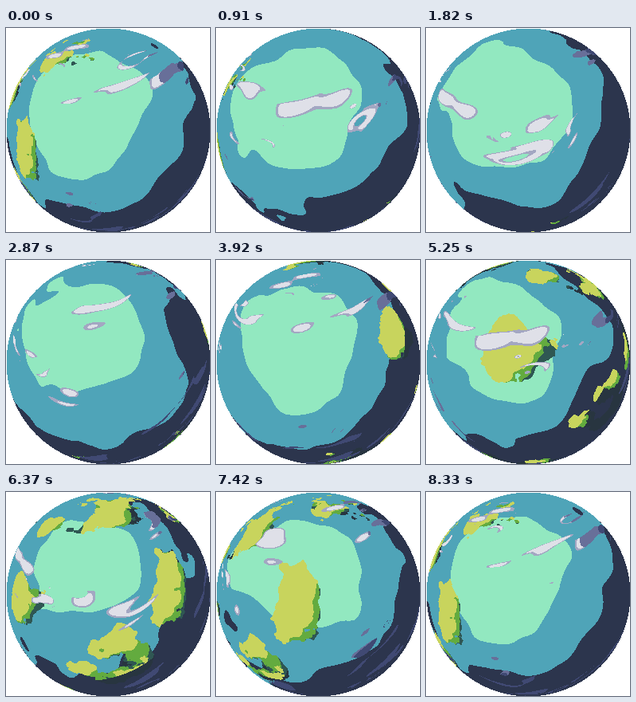
Recreate the animation shown at these times as an HTML page with a canvas. Size 256 px wide and 256 px high, loop 8400 ms.

```html
<!DOCTYPE html>
<html lang="en">
<head>
<meta charset="utf-8">
<title>Turning planet</title>
<style>
  html, body { margin: 0; height: 100%; overflow: hidden; background: #fff; }
  canvas { display: block; width: 100%; height: 100%; image-rendering: pixelated; }
</style>
</head>
<body>
<canvas id="stage" width="256" height="256"></canvas>
<script>
const SIZE = 256, FRAMES = 120, STEP = 70;
const SEED = 6.14, LIGHT = 0.39, TILT = 0.2;
const WATER_SCALE = 5.228, LAND_SCALE = 4.292, CLOUD_SCALE = 7.745;
const SEA_LEVEL = 0.633, CLOUD_LEVEL = 0.565;

const mod = (a, n) => ((a % n) + n) % n;
const fract = a => a - Math.floor(a);
const ease = k => k * k * (3 - 2 * k);
const smoothstep = (hi, a) => ease(Math.max(0, Math.min(1, a / hi)));
const colour = hex => {
  const n = parseInt(hex, 16);
  return (0xff000000 | (n & 255) << 16 | (n & 0xff00) | n >> 16) >>> 0;
};
const WATER = ['92e8c0', '4fa4b8', '2c354d'].map(colour);
const LAND = ['c8d45d', '63ab3f', '2f5753', '283540'].map(colour);
const CLOUD = ['dfe0e8', 'a3a7c2', '686f99', '404973'].map(colour);

// Value noise that tiles every w by h cells
function makeNoise(w, h, octaves) {
  const cells = Float64Array.from({ length: w * h }, (_, k) =>
    fract(Math.sin((k % w) * 12.9898 + Math.floor(k / w) * 78.233) * 15.5453 * SEED));
  const rand = (x, y) => cells[mod(y, h) * w + mod(x, w)];
  function noise(x, y) {
    const ix = Math.floor(x), iy = Math.floor(y);
    const sx = ease(x - ix), sy = ease(y - iy);
    const a = rand(ix, iy), b = rand(ix + 1, iy);
    const c = rand(ix, iy + 1), d = rand(ix + 1, iy + 1);
    return (a + (b - a) * sx) * (1 - sy) + (c + (d - c) * sx) * sy;
  }
  function fbm(x, y) {
    let sum = 0;
    for (let i = 0, amp = 0.5; i < octaves; i++, amp /= 2, x *= 2, y *= 2) sum += noise(x, y) * amp;
    return sum;
  }
  return { rand, fbm };
}
const waterNoise = makeNoise(10, 5, 3);
const landNoise = makeNoise(8, 4, 6);
const cloudNoise = makeNoise(8, 8, 2);

// Flat map position of a point on the disc
function spherify(px, py, angle) {
  const cx = px / SIZE * 2 - 1, cy = py / SIZE * 2 - 1;
  const k = 0.5 / (1 + Math.sqrt(Math.max(0, 1 - cx * cx - cy * cy)));
  const cos = Math.cos(angle), sin = Math.sin(angle);
  return [(cx * cos - cy * sin) * k + 0.5, (cx * sin + cy * cos) * k + 0.5];
}

const pixels = [];
for (let y = 0; y < SIZE; y++)
  for (let x = 0; x < SIZE; x++)
    if (Math.hypot(x / SIZE - 0.5, y / SIZE - 0.5) < 0.49999)
      pixels.push({
        index: y * SIZE + x,
        light: Math.hypot(x / SIZE - LIGHT, y / SIZE - LIGHT),
        flat: spherify(x, y, 0),
        tilted: spherify(x, y, TILT)
      });

function waterColour({ flat: [u, v], light }, t) {
  const d = light + waterNoise.fbm(u * WATER_SCALE + 10 * t, v * WATER_SCALE) * 0.3 - 1 / SIZE;
  return WATER[d > 0.6 ? 2 : d > 0.4 ? 1 : 0];
}

// Land is darker where the ground towards the light is higher
function landColour({ tilted: [u, v], light }, t) {
  const x = u * LAND_SCALE + 8 * t, y = v * LAND_SCALE;
  const height = landNoise.fbm(x, y);
  if (height < SEA_LEVEL) return 0;
  const gain = light > 0.534 ? [1.365, 1.47, 1.89] : light > 0.32 ? [1.05, 1.05, 1.05] : [1, 1, 0.9];
  const shade = [1, 1.5, 2].findIndex((reach, i) => {
    const back = LIGHT * reach * height;
    return landNoise.fbm(x - back, y - back) * gain[i] + light * light * 0.1 < height;
  });
  return LAND[shade < 0 ? 3 : shade];
}

// One soft round hole per cell, of random size
function puff(x, y) {
  const row = Math.floor(y);
  x += row * 0.31;
  const h = cloudNoise.rand(Math.floor(x), row);
  const m = Math.hypot(fract(x) - 0.25 - h / 2, y - row - 0.25 - h / 2);
  return smoothstep(h / 4 + 1e-9, m * 0.75);
}

function cloudColour({ flat: [u, v], light }, t) {
  const shift = 16 * t, x = u * CLOUD_SCALE;
  const y = (v + smoothstep(1.3, Math.abs(u - 0.4))) * 2 * CLOUD_SCALE;
  let swirl = 0;
  for (let i = 11; i < 20; i++) swirl += puff(x * 0.3 + i + shift, y * 0.3 + i);
  const c = cloudNoise.fbm(x + swirl + shift, y + swirl);
  if (c < CLOUD_LEVEL) return 0;
  const d = light + c * 0.2;
  return CLOUD[d > 0.62 ? 3 : d > 0.52 ? 2 : c < CLOUD_LEVEL + 0.03 ? 1 : 0];
}

const ctx = document.getElementById('stage').getContext('2d');
const frames = [];

function render(step) {
  const image = ctx.createImageData(SIZE, SIZE);
  const out = new Uint32Array(image.data.buffer).fill(0xffffffff);
  const t = step / FRAMES;
  for (const p of pixels)
    out[p.index] = cloudColour(p, t) || landColour(p, t) || waterColour(p, t);
  return image;
}

let shown = -1;
function tick() {
  const step = Math.floor(performance.now() / STEP) % FRAMES;
  if (step !== shown) {
    frames[step] ||= render(step);
    ctx.putImageData(frames[step], 0, 0);
    shown = step;
  }
  requestAnimationFrame(tick);
}
tick();
</script>
</body>
</html>
```
